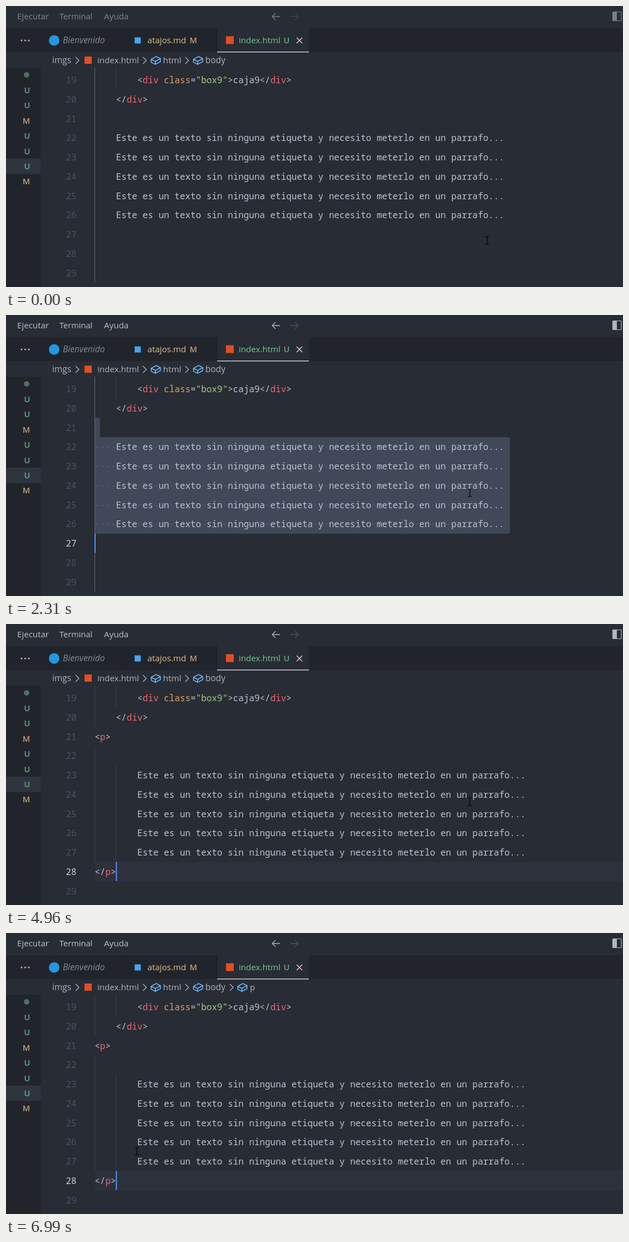
Animation of 1108 by 506 pixels, one loop 7040 ms. Source, as an HTML page:

```html
<!DOCTYPE html>
<html lang="es">
<head>
<meta charset="utf-8">
<title>Envolver con abreviatura</title>
<style>
  html, body { margin: 0; width: 100%; height: 100%; overflow: hidden; background: #282c34; }
  svg { display: block; width: 100%; height: 100%; }
  text { font: 15.1px "Open Sans", "Noto Sans", sans-serif; fill: #b0b5bf; white-space: pre; }
  .code text { font: 500 15.93px "Noto Sans Mono", monospace; fill: #bcc3cf; }
  .code .num { fill: #495162; text-anchor: end; }
  .code .num.on { fill: #c9ced8; }
  .code .dots { fill: #5f6779; }
  .code .tag { fill: #ec6675; }
  .code .attr { fill: #dba36f; }
  .code .str { fill: #a2cc81; }
  .guide { stroke: #3b4048; }
  .guide.on { stroke: #62666f; }
  .line { fill: none; stroke: #b0b5bf; stroke-width: 1.3; }
  .cube { fill: none; stroke: #6cb4f5; stroke-width: 1.6; stroke-linejoin: round; }
  .u, .m { font-weight: 600; font-size: 14.5px; text-anchor: middle; }
  .u { fill: #69a884; }
  .m { fill: #bfa273; }
  .menu text { fill: #bcc1ca; }
  .blur .menu { opacity: .6; }
</style>
</head>
<body>
<svg id="stage" viewBox="0 0 1108 506">
  <defs>
    <clipPath id="selClip"><path id="selClipPath"/></clipPath>
    <filter id="shadow" x="-5%" y="-20%" width="110%" height="150%">
      <feDropShadow dx="0" dy="1" stdDeviation="4" flood-color="#000" flood-opacity=".4"/>
    </filter>
    <path id="chevron" class="line" d="M-3 -6L3 0L-3 6"/>
    <path id="cube" class="cube" d="M-8.3 -2L.8 -7L8.3 -3.3V2.2L-.8 7L-8.3 3.4ZM-8.3 -2L-.8 1.8L8.3 -3.3M-.8 1.8V7"/>
  </defs>
  <rect width="1108" height="506" fill="#282c34"/>

  <g class="menu">
    <text x="20" y="24">Ejecutar</text>
    <text x="96" y="24" style="font-size:14.6px">Terminal</text>
    <text x="176" y="24">Ayuda</text>
    <path class="line" d="M492 19H478M484 13L478 19L484 25"/>
    <path class="line" d="M511 19H525M519 13L525 19L519 25" style="stroke:#4d525c"/>
    <rect x="1089.5" y="10.5" width="15.5" height="16" rx="1" fill="none" stroke="#b0b5bf" stroke-width="1.2"/>
    <rect x="1090" y="11" width="7" height="15" fill="#b0b5bf"/>
  </g>

  <rect y="40" width="1108" height="43" fill="#21252b"/>
  <path d="M214.5 40V83M378.5 40V83" stroke="#1b1e23"/>
  <rect x="379" y="40" width="165" height="43" fill="#282c34"/>
  <rect x="379" y="82" width="165" height="1.5" fill="#c9ccd2"/>
  <g fill="#c0c4cb">
    <circle cx="28" cy="62" r="1.5"/><circle cx="34.5" cy="62" r="1.5"/><circle cx="41" cy="62" r="1.5"/>
  </g>
  <circle cx="86.5" cy="62" r="9.5" fill="#2497e0"/>
  <text x="102" y="67" style="font-style:italic;font-size:15.6px;fill:#858b97">Bienvenido</text>
  <rect x="231" y="56.5" width="11" height="11" fill="#42a5f5"/>
  <text x="254" y="67" style="fill:#e2c08d">atajos.md</text>
  <text class="m" x="336.5" y="67">M</text>
  <rect x="395" y="54.5" width="14" height="14" fill="#e44d26"/>
  <text x="418" y="67" style="fill:#73c991">index.html</text>
  <text class="u" x="504" y="67">U</text>
  <path class="line" d="M522 57L532 67M532 57L522 67" style="stroke:#dfe2e7"/>

  <text x="83" y="103" style="font-size:15.4px">imgs</text>
  <use href="#chevron" x="128" y="98"/>
  <rect x="141" y="91" width="13" height="13" fill="#e44d26"/>
  <text x="164" y="103">index.html</text>
  <use href="#chevron" x="249" y="98"/>
  <use href="#cube" x="269" y="98"/>
  <text x="282" y="103" style="font-size:15.3px">html</text>
  <use href="#chevron" x="325" y="98"/>
  <use href="#cube" x="345" y="98"/>
  <text x="358" y="103" style="font-size:15.4px">body</text>
  <g id="crumb">
    <use href="#chevron" x="405" y="98"/>
    <use href="#cube" x="424.5" y="98"/>
    <text x="438" y="103">p</text>
  </g>

  <rect y="111" width="62.5" height="395" fill="#21252b"/>
  <rect y="275" width="62.5" height="27.5" fill="#2f353f"/>
  <circle cx="37" cy="124" r="4.8" fill="#4b755f"/>
  <g id="status"></g>

  <g class="code">
    <rect id="current" x="160" width="948" height="35" fill="#2c313c"/>
    <path id="sel"/>
    <g id="before">
      <path class="guide on" d="M159.5 111V498"/>
      <path class="guide" d="M197.5 111V150.5"/>
      <g id="dots" clip-path="url(#selClip)"></g>
    </g>
    <g id="after">
      <path class="guide" d="M159.5 111V185.5M159.5 220V429.5M197.5 111V150.5M197.5 255V429.5"/>
    </g>
    <g id="nums"></g>
    <rect id="caret" width="2" height="34.5" fill="#5890f5"/>
  </g>

  <g id="dialog">
    <path d="M129 -4H874V84Q874 90 868 90H135Q129 90 129 84Z" fill="#21252b" filter="url(#shadow)"/>
    <rect x="136" y="14" width="730" height="33" rx="2" fill="#1d1f23" stroke="#3a3f48"/>
    <text id="typed" x="144" y="37" style="fill:#c8ccd3"></text>
    <rect id="inputCaret" y="20" width="1.2" height="22" fill="#d0d3d9"/>
    <text x="142" y="69" style="fill:#c8ccd3">Escribir abreviatura (Presione "Entrar" para confirmar o "Esc" para cancelar)</text>
  </g>

  <path id="mouse" d="M-3.5 -7Q0 -7 0 -5Q0 -7 3.5 -7M0 -5.5V5.5M-3.5 7Q0 7 0 5Q0 7 3.5 7" fill="none" stroke="#08090b" stroke-width="1.3"/>
</svg>
<script>
const LOOP = 7040, PRESS = 450, DRAG_END = 1100, OPEN = 2930, TYPE = 4450, CLOSE = 4950, CRUMB = 5600;
const X0 = 159.3, CHAR = 9.56, PITCH = 34.75, FIRST = 19, LAST = 29, ANCHOR = 21;
const SENTENCE = 'Este es un texto sin ninguna etiqueta y necesito meterlo en un parrafo...';
const INDENTED = ' '.repeat(4) + SENTENCE;

const $ = id => document.getElementById(id);
const midY = n => 133.5 + (n - FIRST) * PITCH;
const topY = n => midY(n) - 17.8;
const colX = c => X0 + c * CHAR;
const lineLength = n => n >= 22 && n <= 26 ? INDENTED.length : 0;
const show = (id, on) => { $(id).style.display = on ? '' : 'none'; };
const blink = age => age % 1000 < 500;
const clamp = (v, lo, hi) => Math.min(hi, Math.max(lo, v));

function addText(parent, x, y, parts, cls = '') {
  const el = document.createElementNS('http://www.w3.org/2000/svg', 'text');
  el.setAttribute('x', x);
  el.setAttribute('y', y);
  el.setAttribute('class', cls);
  for (const part of [].concat(parts)) {
    const [str, kind = ''] = [].concat(part);
    const span = document.createElementNS(el.namespaceURI, 'tspan');
    span.textContent = str;
    span.setAttribute('class', kind);
    el.append(span);
  }
  parent.append(el);
  return el;
}

const addCode = (id, n, col, parts, cls) => addText($(id), colX(col), midY(n) + 5.6, parts, cls);

const DIV = ['div', 'tag'], P = ['p', 'tag'];
for (const id of ['before', 'after']) {
  addCode(id, 19, 8, ['<', DIV, ' ', ['class', 'attr'], '=', ['"box9"', 'str'], '>caja9</', DIV, '>']);
  addCode(id, 20, 4, ['</', DIV, '>']);
}
const spaceMarks = INDENTED.replace(/\S/g, '_').replace(/ /g, '·').replace(/_/g, ' ');
for (let n = 22; n <= 26; n++) {
  addCode('before', n, 4, SENTENCE);
  addCode('after', n + 1, 8, SENTENCE);
  addCode('dots', n, 0, spaceMarks, 'dots');
}
addCode('after', 21, 0, ['<', P, '>']);
addCode('after', 28, 0, ['</', P, '>']);

const numbers = [];
for (let n = FIRST; n <= LAST; n++) numbers[n] = addText($('nums'), 126.5, midY(n) + 5.6, String(n), 'num');
[...'UUMUUUM'].forEach((s, i) => addText($('status'), s === 'U' ? 38 : 36.5, 157 + i * 27.4, s, s.toLowerCase()));

// time, x, y, eased arrival
const track = [
  [50, 864, 422], [400, 163, 203, true], [500, 163, 203], [565, 217, 240], [610, 256, 264],
  [950, 950, 427], [1250, 950, 427], [1850, 833, 320, true], [5850, 833, 320], [6750, 235, 393, true]
];

function mouseAt(t) {
  const i = track.findIndex(k => k[0] > t);
  if (i < 0) return track[track.length - 1].slice(1, 3);
  if (i === 0) return track[0].slice(1, 3);
  const [a, b] = [track[i - 1], track[i]];
  let u = (t - a[0]) / (b[0] - a[0]);
  if (b[3]) u = u * u * (3 - 2 * u);
  return [a[1] + (b[1] - a[1]) * u, a[2] + (b[2] - a[2]) * u];
}

// Caret position: the drag trails the pointer slightly.
function headAt(t) {
  if (t >= CLOSE) return { line: 28, col: 4 };
  if (t >= OPEN) return { line: 26, col: lineLength(26) };
  const [x, y] = mouseAt(Math.min(t, DRAG_END) - 45);
  const line = clamp(Math.floor((y - topY(ANCHOR)) / PITCH) + ANCHOR, ANCHOR, LAST);
  return { line, col: clamp(Math.round((x - X0) / CHAR), 0, lineLength(line)) };
}

function selectionPath(head, radius) {
  const rows = [];
  for (let n = ANCHOR; n <= head.line; n++) {
    const cols = n < head.line ? lineLength(n) + 1 : head.col;
    if (cols) rows.push([topY(n), colX(cols)]);
  }
  return rows.map(([y, r], i) => {
    const first = i === 0, last = i === rows.length - 1, b = y + PITCH + (last ? 0 : .1);
    const tl = first ? radius : 0, bl = last ? radius : 0;
    const tr = first || rows[i - 1][1] < r ? radius : 0;
    const br = last || rows[i + 1][1] < r ? radius : 0;
    return `M${X0 + tl} ${y}H${r - tr}Q${r} ${y} ${r} ${y + tr}V${b - br}Q${r} ${b} ${r - br} ${b}` +
      `H${X0 + bl}Q${X0} ${b} ${X0} ${b - bl}V${y + tl}Q${X0} ${y} ${X0 + tl} ${y}Z`;
  }).join('');
}

function render(t) {
  const focused = t >= PRESS, open = t >= OPEN && t < CLOSE, done = t >= CLOSE;
  const head = headAt(t);
  $('stage').classList.toggle('blur', !focused);
  show('before', !done);
  show('after', done);
  show('dialog', open);
  show('crumb', t >= CRUMB);

  const d = focused && !done ? selectionPath(head, open ? 0 : 3) : '';
  $('sel').setAttribute('d', d);
  $('selClipPath').setAttribute('d', d);
  $('sel').setAttribute('fill', open ? '#343a46' : '#404859');

  show('current', focused && !open && !d);
  $('current').setAttribute('y', topY(head.line));
  numbers.forEach((el, n) => el.classList.toggle('on', focused && n === head.line));

  const age = done ? t - CLOSE : t - 950;
  show('caret', focused && !open && (age < 0 || blink(age)));
  $('caret').setAttribute('x', colX(head.col) - .3);
  $('caret').setAttribute('y', topY(head.line));

  const typed = t >= TYPE;
  $('typed').textContent = typed ? 'p' : '';
  $('inputCaret').setAttribute('x', typed ? 153.5 : 144);
  show('inputCaret', blink(t - (typed ? TYPE : OPEN)));

  $('mouse').setAttribute('transform', `translate(${mouseAt(t)})`);
}

const start = performance.now();
function tick() {
  render((performance.now() - start) % LOOP);
  requestAnimationFrame(tick);
}
tick();
</script>
</body>
</html>
```
